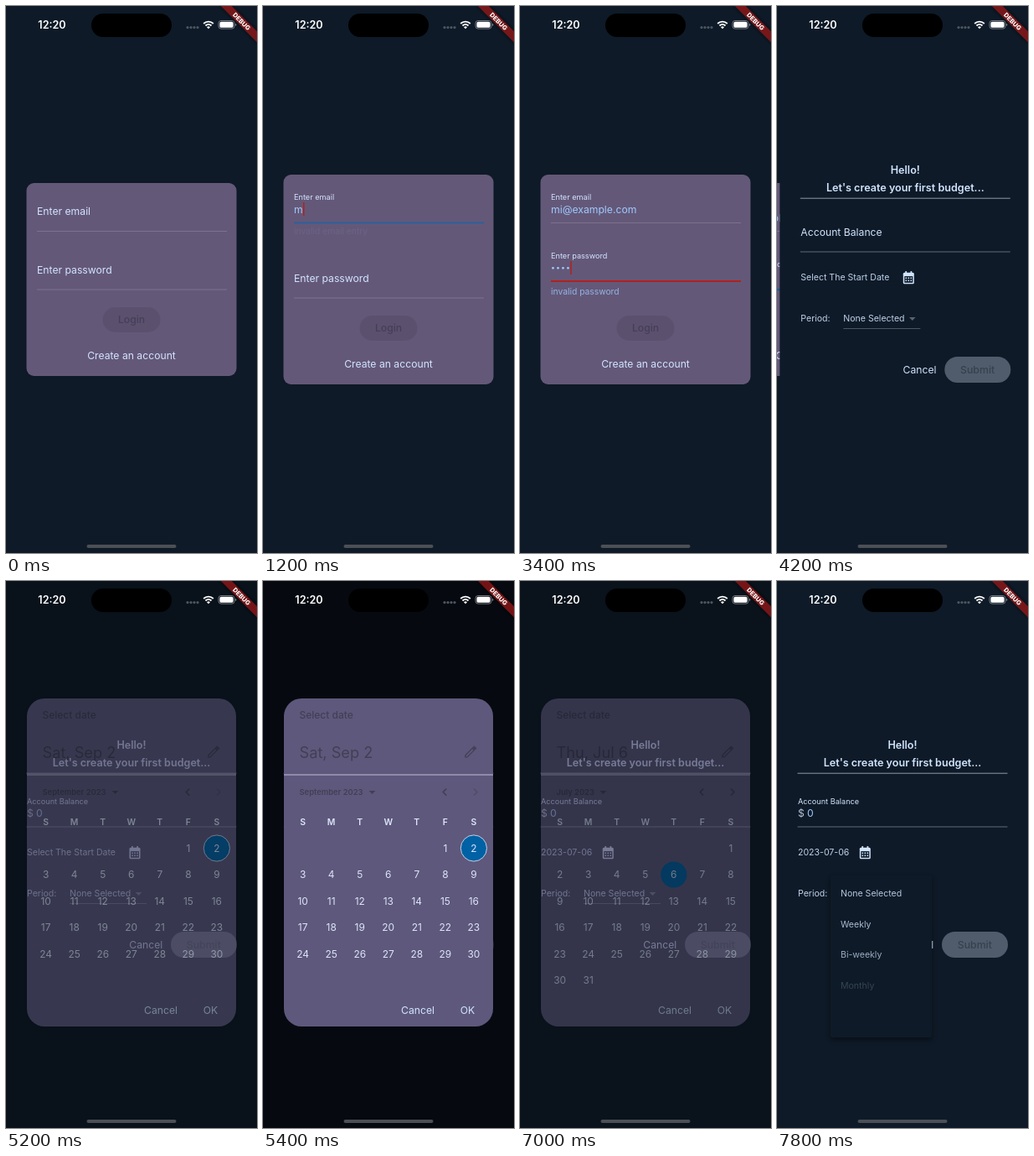
An HTML page for the animation above (8 s loop, 300x652 px).

```html
<!DOCTYPE html>
<html lang="en">
<head>
<meta charset="utf-8">
<title>Budget app</title>
<style>
html, body { margin: 0; width: 100%; height: 100%; overflow: hidden; background: #0e1a27; }
svg { display: block; width: 100vw; height: 100vh; font-family: Inter, Roboto, sans-serif; }
</style>
</head>
<body>
<svg viewBox="0 0 300 652">
  <defs>
    <filter id="blur" x="-30%" y="-30%" width="160%" height="160%"><feGaussianBlur stdDeviation="3"/></filter>
    <clipPath id="dialogClip"><rect x="25" y="270" width="250" height="225"/></clipPath>
  </defs>
  <g id="app"></g>
  <g id="chrome">
    <text x="55" y="27" font-size="12.6" font-weight="600" fill="#fff" text-anchor="middle">12:20</text>
    <rect x="102" y="9" width="96" height="28" rx="14"/>
    <g fill="#4d5660">
      <circle cx="217" cy="25.6" r="1.6"/><circle cx="221" cy="25.6" r="1.6"/>
      <circle cx="225" cy="25.6" r="1.6"/><circle cx="229" cy="25.6" r="1.6"/>
    </g>
    <g fill="none" stroke="#fff" stroke-width="1.9">
      <path d="M236.2 21a8.3 8.3 0 0 1 11.6 0M238.5 23.5a5 5 0 0 1 7 0"/>
      <path d="M242 27.3l-2-2.1a2.9 2.9 0 0 1 4 0z" fill="#fff" stroke="none"/>
    </g>
    <rect x="254" y="17.5" width="19" height="9.6" rx="3" fill="none" stroke="#7d848c" stroke-width=".9"/>
    <rect x="255.4" y="18.8" width="16.2" height="7" rx="1.9" fill="#fff"/>
    <path d="M274 20.8q1.3 .5 1.3 1.5t-1.3 1.5z" fill="#7d848c"/>
    <g transform="translate(300 0) rotate(45)">
      <rect x="-30.5" y="21.4" width="61" height="9.1" opacity=".5" filter="url(#blur)"/>
      <rect x="-30.5" y="21.4" width="61" height="9.1" fill="#b71c1c" fill-opacity=".63"/>
      <text y="28.7" font-size="7.5" font-weight="800" fill="#fff" text-anchor="middle">DEBUG</text>
    </g>
    <rect x="96.5" y="642" width="107" height="4" rx="2" fill="#4c5055"/>
  </g>
</svg>
<script>
const LOOP = 8000, STEP = 200;
const BG = '#0e1a27', PALE = '#d1e4ff', SKY = '#9ecaff', BLUE = '#0061a4', RED = '#b3201c', INK = '#433f54';
const EMAIL = 'mi@example.com';
const app = document.getElementById('app');

const lerp = (a, b, p) => a + (b - a) * p;

// Linear track through [time, value] pairs
function track(t, ...keys) {
  if (t <= keys[0][0]) return keys[0][1];
  for (let i = 1; i < keys.length; i++) {
    const [t0, v0] = keys[i - 1], [t1, v1] = keys[i];
    if (t <= t1) return lerp(v0, v1, (t - t0) / (t1 - t0));
  }
  return keys[keys.length - 1][1];
}

// y is the middle of the capitals
function text(s, x, y, size, fill, { anchor = 'start', weight = 400, opacity = 1 } = {}) {
  return `<text x="${x}" y="${y + size * .364}" font-size="${size}" font-weight="${weight}" fill="${fill}" text-anchor="${anchor}" opacity="${opacity}">${s}</text>`;
}
const mid = (s, x, y, size, fill, weight = 400) => text(s, x, y, size, fill, { anchor: 'middle', weight });
const rect = (x, y, w, h, fill, r = 0, extra = '') =>
  `<rect x="${x}" y="${y}" width="${w}" height="${h}" rx="${r}" fill="${fill}" ${extra}/>`;
const group = (s, x = 0, y = 0, opacity = 1) => `<g transform="translate(${x} ${y})" opacity="${opacity}">${s}</g>`;
const stroke = (d, color, w = 1.5) => `<path d="${d}" fill="none" stroke="${color}" stroke-width="${w}"/>`;
const caret = (x, y, color) => `<path d="M${x - 3.8} ${y - 1.9}h7.6l-3.8 3.8z" fill="${color}"/>`;

function floatLabel(s, x, y, lift) {
  return text(s, x, y - 7 * lift, lerp(12.2, 9.17, lift), PALE);
}

function underline(y, focused, color) {
  return focused ? rect(37, y - 1, 227, 2, color) : rect(37, y - .5, 227, 1, '#7c728f');
}

function loginPage(t) {
  const emailFocus = t >= 800 && t < 2400, passFocus = t >= 2400;
  const emailBad = t >= 1200 && t < 1800, passBad = t >= 3200 && t < 3600;
  const typed = EMAIL.slice(0, Math.round(track(t, [1000, 0], [1200, 1], [1800, 14])));
  const dots = Math.round(track(t, [3000, 0], [3200, 2], [3400, 4], [3800, 8]));
  const e1 = emailBad ? 20 : 0, e2 = passBad ? 20 : 0, top = 211 - (e1 + e2) / 2;
  const ready = t >= 3600;
  let s = rect(24.5, 0, 251, 230 + e1 + e2, '#645878', 9);

  s += floatLabel('Enter email', 37, 34, track(t, [600, 0], [1000, 1]));
  s += `<text id="email" x="37" y="45.7" font-size="12.2" fill="${SKY}">${typed}</text>`;
  s += underline(57.5, emailFocus, emailBad ? (t < 1400 ? '#2d5f9a' : RED) : BLUE);
  if (emailBad) {
    const p = track(t, [1200, .12], [1400, 1]);
    s += text('invalid email entry', 37, lerp(67, 69.5, p), 10.3, SKY, { opacity: p * .8 });
  }
  if (emailFocus) s += rect(0, 33, 1.5, 16, emailBad ? RED : BLUE, 0, 'id="cursor"');

  let p = floatLabel('Enter password', 37, 103.5, track(t, [2200, 0], [2600, 1]));
  for (let i = 0; i < dots; i++) p += `<circle cx="${39.4 + i * 6}" cy="111.3" r="1.35" fill="${SKY}"/>`;
  p += underline(127, passFocus, passBad ? RED : BLUE);
  if (passFocus) p += rect(37 + dots * 5.8, 103, 1.5, 16, passBad ? RED : BLUE);
  if (passBad) p += text('invalid password', 37, 139.5, 10.3, SKY, { opacity: t < 3400 ? .45 : .8 });
  s += group(p, 0, e1);

  const below = rect(115.5, 148, 69, 30, ready ? '#eef3fb' : '#5b516e', 15)
    + mid('Login', 150, 163, 12.2, ready ? BLUE : '#463f58', 500)
    + mid('Create an account', 150, 206, 12.2, PALE);
  return group(s + group(below, 0, e1 + e2), 0, top);
}

function calendarIcon(x, y) {
  let s = rect(-6.5, -6, 13, 13.5, PALE, 1.5) + rect(-4, -7.6, 1.8, 3, PALE) + rect(2.2, -7.6, 1.8, 3, PALE)
    + rect(-5, -1.6, 10, 7.7, BG);
  for (let i = 0; i < 6; i++) s += rect(-3.8 + (i % 3) * 3, i < 3 ? -.2 : 2.8, 1.6, 1.6, PALE);
  return group(s, x, y);
}

function menu(t) {
  const p = track(t, [7600, .15], [7800, 1]), grow = t >= 7800;
  const y = grow ? 351 : 354, h = grow ? 193 : 37;
  let s = rect(64, y + 3, 121, h, '#000', 2, 'opacity=".45" filter="url(#blur)"') + rect(64, y, 121, h, BG, 2);
  const items = ['None Selected', 'Weekly', 'Bi-weekly', 'Monthly'], fade = [.85, .8, .72, .2];
  items.forEach((name, i) => {
    if (grow || i === 0) s += text(name, 76, 372 + i * 36.7, 10.55, PALE, { opacity: fade[i] });
  });
  return group(s, 0, 0, p);
}

function budgetPage(t) {
  const lift = track(t, [4400, 0], [4800, 1]);
  const focused = t >= 4600 && t < 5200, dated = t >= 7000;
  let s = rect(0, 0, 300, 652, BG);
  s += mid('Hello!', 150, 195.5, 12.6, PALE, 600);
  s += mid("Let's create your first budget...", 150, 216, 12.6, PALE, 600);
  s += rect(24.5, 228.7, 251, 1, '#8d97a5');
  s += text('Account Balance', 25, lerp(270, 262.5, lift), lerp(12.2, 9.17, lift), PALE);
  if (t >= 4800) s += text('$', 25, 276.5, 12.2, '#b4c2d4');
  if (t >= 5000) s += text('0', 36, 276.5, 12.2, SKY);
  if (focused) s += rect(t >= 5000 ? 44.5 : 36, 268, 1.5, 16, BLUE);
  s += focused ? rect(24.5, 292, 251, 2, BLUE) : rect(24.5, 292.5, 251, 1, '#5f6a77');
  s += text(dated ? '2023-07-06' : 'Select The Start Date', 25, 323.3, 10.55, PALE, { opacity: .9 });
  s += calendarIcon(dated ? 105.3 : 154, 323.7);
  s += text('Period:', 25, 372, 10.55, PALE, { opacity: .9 });
  s += text('None Selected', 76, 372, 10.55, PALE, { opacity: .9 });
  s += caret(158.5, 373, '#5c646e') + rect(76, 384, 92, 1, '#4b5663');
  s += text('Cancel', 147.3, 433.5, 12.2, PALE);
  s += rect(197, 418, 79, 31, '#505c6b', 15.5) + mid('Submit', 236.3, 433.5, 12.3, '#36414f', 500);
  if (t >= 7600) s += menu(t);
  return s;
}

const MONTHS = [
  { name: 'September 2023', first: 5, days: 30, caretX: 130.5 },
  { name: 'August 2023', first: 2, days: 31, caretX: 113 },
  { name: 'July 2023', first: 6, days: 31, caretX: 99.5 }
];

function monthGrid(index, t) {
  const { first, days } = MONTHS[index];
  const colX = c => 47.6 + c * 34.05;
  let s = '';
  [...'SMTWTFS'].forEach((d, c) => s += mid(d, colX(c), 287, 10.4, '#dde6fa', 600));
  for (let d = 1; d <= days; d++) {
    const cell = first + d - 1, x = colX(cell % 7), y = 318.5 + Math.floor(cell / 7) * 31.5;
    const today = index === 0 && d === 2;
    if (t < 6400 ? today : index === 2 && d === 6)
      s += `<circle cx="${x}" cy="${y}" r="15.6" fill="${BLUE}" ${today ? 'stroke="#d5dcec" stroke-width=".9"' : ''}/>`;
    s += mid(d, x, y, 11.9, '#dde6fa');
  }
  return s;
}

function dateDialog(t) {
  const page = track(t, [5400, 0], [5600, .4], [5800, 1], [6000, 1.5], [6200, 2]);
  const month = MONTHS[Math.round(page)];
  let s = rect(25, 140, 250, 391, '#5e587c', 21);
  s += text('Select date', 43.5, 159.7, 12, INK, { weight: 500 });
  s += text(t < 6400 ? 'Sat, Sep 2' : 'Thu, Jul 6', 43.5, 204.3, 18.2, INK);
  s += stroke('M241.9 209.9v-2.2l8.3-8.3 2.2 2.2-8.3 8.3zM251.2 198.3l1.2-1 2.1 2.1-1 1.2z', INK, 1.3);
  s += rect(25, 230.4, 250, 1.2, '#b0adc6');
  s += text(month.name, 43.5, 251.7, 9.4, INK, { weight: 600 }) + caret(month.caretX, 252, INK);
  s += stroke('M219.2 247.6l-4 4 4 4', INK) + stroke('M252 247.6l4 4-4 4', page < .5 ? '#4f4a66' : INK, page < .5 ? 1.1 : 1.5);
  let grids = '';
  MONTHS.forEach((m, i) => {
    if (Math.abs(i - page) < 1) grids += group(monthGrid(i, t), (page - i) * 250);
  });
  s += `<g clip-path="url(#dialogClip)">${grids}</g>`;
  return s + mid('Cancel', 185, 511.5, 12.2, PALE) + mid('OK', 244.5, 511.5, 12.2, PALE);
}

function draw(t) {
  let s = rect(0, 0, 300, 652, BG);
  if (t < 4200) s += loginPage(t);
  else {
    const slide = track(t, [4200, 3.3], [4400, 0]);
    if (slide) s += group(loginPage(t), -100 + slide / 3);
    s += group(budgetPage(t), slide);
  }
  const open = track(t, [5000, 0], [5200, .55], [5400, 1], [6800, 1], [7000, .5], [7200, 0]);
  if (open) s += rect(0, 0, 300, 652, '#000', 0, `opacity="${open * .6}"`) + group(dateDialog(t), 0, 0, open);
  app.innerHTML = s;
  const cursor = document.getElementById('cursor');
  if (cursor) cursor.setAttribute('x', 37.3 + document.getElementById('email').getComputedTextLength());
}

// The picture advances in fifths of a second
let shown = -1;
const start = performance.now();
function tick() {
  const t = Math.floor(((performance.now() - start) % LOOP) / STEP) * STEP;
  if (t !== shown) draw(shown = t);
  requestAnimationFrame(tick);
}
tick();
</script>
</body>
</html>
```
